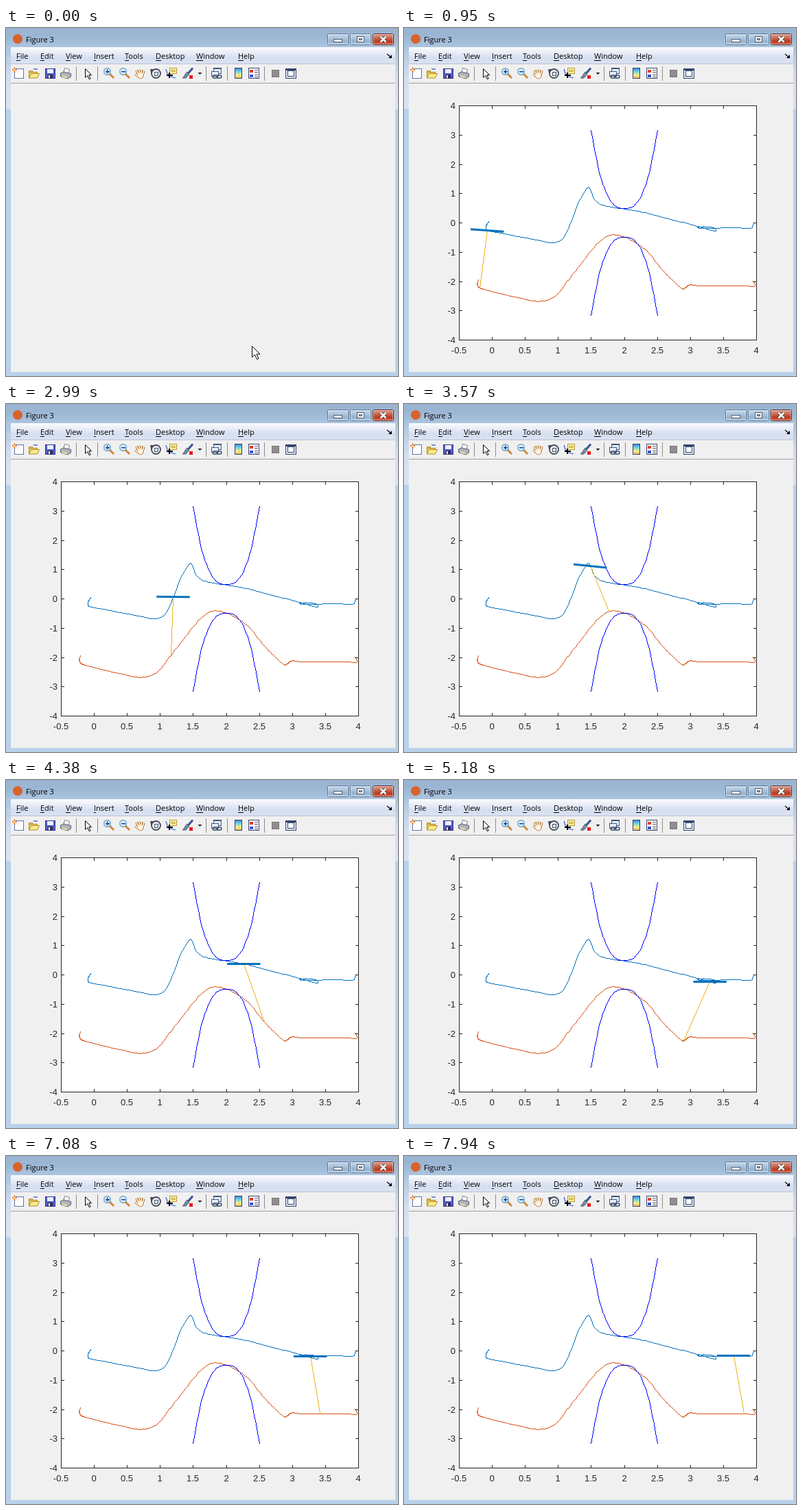
Write an HTML page with a canvas that moves like this. It is 571 px wide and 508 px high and loops after 8 s.

```html
<!DOCTYPE html>
<html lang="en">
<head>
<meta charset="utf-8">
<title>Figure 3</title>
<style>
html, body { margin: 0; width: 100%; height: 100%; overflow: hidden; background: #f0f0f0; }
canvas { display: block; }
</style>
</head>
<body>
<canvas id="stage" width="571" height="508"></canvas>
<script>
const LOOP = 8000, START = 90, STEP = 78, END = 8600;
const stage = document.getElementById('stage');
const ctx = stage.getContext('2d');

// Waypoints: time, x, y
const vehicle = [
  [0, 123, 282], [600, 119, 290], [950, 121, 295], [1400, 138, 298.5], [2120, 191, 308.5],
  [2450, 218, 313], [2720, 233, 304], [2980, 243.5, 281], [3150, 254, 254], [3400, 267.5, 232],
  [3560, 272, 238], [3720, 277, 250], [3920, 292, 259], [4380, 346, 268], [4960, 427, 289],
  [5300, 453, 296], [5560, 451, 291.5], [6030, 437, 289.5], [6420, 427, 291], [6900, 438, 292],
  [7940, 482, 291], [8400, 505, 291.5], [END, 508.5, 285]];
const load = [
  [0, 108, 367], [600, 106.5, 374], [950, 110, 379], [1400, 127, 384], [2120, 170, 394],
  [2420, 198, 398.5], [2720, 221, 390], [2980, 240, 366], [3420, 288, 308], [3680, 313, 302.5],
  [4070, 350, 322], [4380, 376, 353], [5000, 404, 379.5], [5300, 409, 379], [5700, 414, 375],
  [6030, 419, 374.5], [6420, 431, 376], [7940, 497, 376], [8300, 507, 377], [8420, 511, 376],
  [END, 508, 369]];

// Smooth passage through the waypoints
function along(path, t) {
  const last = path.length - 1;
  let i = 0;
  while (i < last - 1 && path[i + 1][0] <= t) i++;
  const a = path[i], b = path[i + 1], span = b[0] - a[0], f = (t - a[0]) / span;
  const speed = (j, k) => {
    const p = path[Math.max(0, j - 1)], q = path[Math.min(last, j + 1)];
    return (q[k] - p[k]) / (q[0] - p[0]) * span;
  };
  return [1, 2].map(k => a[k] + (b[k] - a[k]) * f * f * (3 - 2 * f) +
    f * (1 - f) * ((1 - f) * speed(i, k) - f * speed(i + 1, k)));
}

const range = (n, fn) => Array.from({ length: n }, (_, i) => fn(i));
const trace = path => range(END / 25 + 1, i => along(path, i * 25));
const bump = (t, mid, width) => Math.exp(-(((t - mid) / width) ** 2));
const tilt = t => 4 * bump(t, 850, 250) + 5 * bump(t, 3600, 450);

function layer(draw) {
  const c = document.createElement('canvas');
  c.width = stage.width;
  c.height = stage.height;
  draw(c.getContext('2d'));
  return c;
}

function rect(g, color, x, y, w, h) {
  g.fillStyle = color;
  g.fillRect(x, y, w, h);
}

function box(g, fill, edge, x, y, w, h) {
  rect(g, edge, x, y, w, h);
  rect(g, fill, x + 1, y + 1, w - 2, h - 2);
}

function paint(g, fill, stroke, width = 1) {
  if (fill) { g.fillStyle = fill; g.fill(); }
  if (stroke) { g.strokeStyle = stroke; g.lineWidth = width; g.stroke(); }
}

function poly(g, pts, fill, stroke, width) {
  g.beginPath();
  pts.forEach(p => g.lineTo(p[0], p[1]));
  if (fill) g.closePath();
  paint(g, fill, stroke, width);
}

const line = (g, color, width, x, y, p, q) => poly(g, [[x, y], [p, q]], null, color, width);

function oval(g, x, y, rx, ry, fill, stroke, width) {
  g.beginPath();
  g.ellipse(x, y, rx, ry, 0, 0, 7);
  paint(g, fill, stroke, width);
}

function shade(g, y0, y1, ...colors) {
  const s = g.createLinearGradient(0, y0, 0, y1);
  colors.forEach((c, i) => s.addColorStop(i / (colors.length - 1), c));
  return s;
}

// Hard-edged one-pixel line
function pixelLine(g, color, pts) {
  g.fillStyle = color;
  for (let i = 1; i < pts.length; i++) {
    const [x, y] = pts[i - 1].map(Math.round), [p, q] = pts[i].map(Math.round);
    const n = Math.max(Math.abs(p - x), Math.abs(q - y), 1);
    for (let k = 0; k <= n; k++)
      g.fillRect(Math.round(x + (p - x) * k / n), Math.round(y + (q - y) * k / n), 1, 1);
  }
}

function pointer(g, x, y, size) {
  const shape = [[0, 0], [0, 16], [4, 12.5], [7, 19], [9.5, 18], [6.5, 11.5], [11.5, 11.5]];
  poly(g, shape.map(p => [x + 0.5 + p[0] * size, y + 0.5 + p[1] * size]), '#fff', '#000');
}

function windowButton(g, x, colors, edge) {
  g.beginPath();
  g.roundRect(x + 0.5, 8.5, 30, 16, 2);
  paint(g, shade(g, 8, 25, ...colors), edge);
  g.strokeStyle = 'rgba(255,255,255,.45)';
  g.strokeRect(x + 1.5, 9.5, 28, 14);
}

function magnifier(g, x, plus) {
  line(g, '#c98a3a', 3, x + 9, 67, x + 15, 73);
  oval(g, x + 5.5, 63.5, 4.8, 4.8, '#d9f1fb', '#6fa3c7', 1.4);
  rect(g, '#1b3f94', x + 3, 63, 6, 1.5);
  if (plus) rect(g, '#1b3f94', x + 5, 60.5, 1.5, 6);
}

function toolbar(g) {
  const navy = '#34466e';
  [102, 133, 291, 322, 376].forEach(x => rect(g, '#8c8c8c', x, 56, 1, 21));

  // new
  box(g, '#fdfdff', '#5c78a8', 12, 59, 14, 15);
  line(g, '#e8562a', 1.5, 9, 61, 16, 61);
  line(g, '#e8562a', 1.5, 12.5, 57.5, 12.5, 65);
  oval(g, 12.5, 61, 1.8, 1.8, '#ffcf4a');
  // open
  box(g, '#f5d35c', '#b3892b', 33, 62, 6, 11);
  box(g, '#f5d35c', '#b3892b', 33, 64, 13, 9);
  poly(g, [[33.5, 73], [36.5, 66.5], [48.5, 66.5], [45.5, 73]], '#ffe98c', '#b3892b');
  line(g, '#3d6cb0', 1.4, 40, 60, 46, 60);
  // save
  box(g, '#5659c4', '#33358a', 57, 59, 15, 15);
  rect(g, '#e9f0fb', 60, 60, 9, 6);
  rect(g, '#2c2e55', 61, 68, 7, 5);
  rect(g, '#f4f4f4', 62, 69, 2, 4);
  // print
  poly(g, [[83.5, 66], [85.5, 58.5], [92.5, 60.5], [90.5, 67]], '#fff', '#77808c');
  poly(g, [[79.5, 66], [84, 64], [94.5, 66.5], [94.5, 71], [89.5, 74], [79.5, 70.5]], '#aeb4bf', '#565d68');
  line(g, '#f4e6a0', 2, 82, 70, 89, 72.5);

  pointer(g, 115, 59, 0.8);
  magnifier(g, 142, true);
  magnifier(g, 165, false);
  // pan
  const hand = (width, color) => {
    for (let i = 0; i < 4; i++) line(g, color, width, 193 + i * 2, 68, 190 + i * 3.7, 60.5 + Math.abs(i - 1.4));
    line(g, color, width, 193, 71, 188.5, 67);
    oval(g, 196, 69.5, 2.7 + width / 2, 3 + width / 2, color);
  };
  hand(3.6, '#a46a2c');
  hand(1.8, '#fff3dc');
  // rotate
  oval(g, 218.5, 66.5, 6.5, 6.5, null, '#444d5c', 1.8);
  poly(g, [[210, 60], [216, 60], [211, 66]], '#444d5c');
  box(g, '#d8e4f4', '#46546a', 216, 64, 6, 6);
  // data tip
  box(g, '#fff3a8', '#b59a37', 238, 58, 11, 9);
  rect(g, '#b59a37', 240, 61, 7, 1);
  rect(g, '#b59a37', 240, 63, 7, 1);
  poly(g, [[233, 60], [235, 67], [240, 71], [247, 73]], null, '#3455c8', 1.2);
  rect(g, '#000', 234, 68, 9, 2);
  rect(g, '#000', 237, 65, 2, 8);
  // brush
  line(g, '#35568f', 3, 272, 58.5, 265, 66.5);
  poly(g, [[264, 64], [267, 67], [262, 73], [257.5, 73]], '#7d8ca5', '#44516a');
  rect(g, '#f01414', 267, 69, 5, 5);
  poly(g, [[279.5, 65], [285.5, 65], [282.5, 68]], '#222');
  // link
  box(g, '#e7edf7', '#3f5682', 302, 58, 12, 9);
  rect(g, '#3f5682', 302, 58, 12, 2);
  box(g, '#e7edf7', '#3f5682', 299, 63, 11, 8);
  oval(g, 304.5, 71, 3.5, 2.2, null, '#3f4c68', 1.5);
  oval(g, 310.5, 71, 3.5, 2.2, null, '#3f4c68', 1.5);
  // colour bar
  box(g, shade(g, 58, 74, '#3c78e0', '#6cd1e6', '#f5ee85', '#f4a95c'), navy, 333, 58, 11, 16);
  // legend
  box(g, '#fff', navy, 353, 58, 16, 16);
  rect(g, '#e23a2e', 355, 61, 5, 4);
  rect(g, '#3a4fd0', 355, 68, 5, 4);
  [61, 64, 68, 71].forEach(y => rect(g, '#555', 362, y, 5, 1));
  // hide and show tools
  box(g, '#8e8e8e', '#777', 387, 61, 11, 11);
  box(g, '#dce6f5', navy, 407, 59, 16, 15);
  rect(g, navy, 407, 59, 16, 3);
  box(g, '#fff', navy, 410, 62, 10, 9);
}

const chrome = layer(g => {
  rect(g, '#b9d1ea', 0, 0, 571, 508);
  rect(g, shade(g, 0, 28, '#98b3d0', '#9cb8d5', '#adc5df'), 0, 0, 571, 28);
  rect(g, shade(g, 28, 118, '#adc5df', '#d2deef', '#dae4f3'), 0, 28, 571, 90);
  rect(g, '#f0f0f0', 7, 28, 560, 474);
  rect(g, shade(g, 28, 52, '#fbfcfe', '#e8edf7', '#d5def0', '#dae2f2'), 7, 28, 560, 24);
  rect(g, '#b6bccc', 7, 52, 560, 1);
  rect(g, '#f6f7f9', 7, 53, 560, 1);
  rect(g, '#a0a0a0', 7, 80, 560, 1);

  oval(g, 17, 16, 7, 7, '#d9622b');
  g.font = '11px "Open Sans", sans-serif';
  g.fillStyle = '#000';
  g.fillText('Figure 3', 29, 21);
  const menus = { File: 15, Edit: 50, View: 87, Insert: 128, Tools: 173, Desktop: 218, Window: 277, Help: 338 };
  for (const [name, x] of Object.entries(menus)) {
    g.fillText(name, x, 45);
    g.fillRect(x, 47, Math.round(g.measureText(name[0]).width), 1);
  }
  line(g, '#000', 1.2, 555, 38, 560, 42);
  poly(g, [[562, 39], [562, 44], [557, 44]], '#000');

  const blue = ['#c9d9ea', '#b3c8de', '#96b1ce', '#b5cce4'];
  windowButton(g, 468, blue, '#5c7692');
  windowButton(g, 501, blue, '#5c7692');
  windowButton(g, 534, ['#e3a89b', '#d0705c', '#b93a20', '#d4674a'], '#5b2a2a');
  box(g, '#fff', '#4d5a6b', 477, 16, 13, 5);
  box(g, '#fff', '#4d5a6b', 511, 12, 11, 9);
  box(g, '#a9bfd8', '#4d5a6b', 514, 15, 5, 3);
  for (const [color, width] of [['#5b3a3a', 4.5], ['#fff', 2.5]])
    for (const s of [4, -4]) line(g, color, width, 549.5 - s, 12.5, 549.5 + s, 20.5);
  toolbar(g);
});

const px = x => 80 + (x + 0.5) * 433 / 4.5;
const py = y => 113 + (4 - y) * 342 / 8;

const plot = layer(g => {
  const ink = '#262626';
  box(g, '#fff', ink, 80, 113, 434, 343);
  g.font = '13px "Liberation Sans", Arial, sans-serif';
  g.textAlign = 'center';
  for (let v = -0.5; v <= 4; v += 0.5) {
    const x = Math.round(px(v));
    rect(g, ink, x, 451, 1, 4);
    rect(g, ink, x, 114, 1, 4);
    g.fillText(v, x, 475);
  }
  g.textAlign = 'right';
  for (let v = -4; v <= 4; v++) {
    const y = Math.round(py(v));
    rect(g, ink, 81, y, 4, 1);
    rect(g, ink, 509, y, 4, 1);
    g.fillText(v, 75, y + 5);
  }
  pixelLine(g, '#0072bd', trace(vehicle));
  pixelLine(g, '#d95319', trace(load));
  for (const side of [1, -1])
    pixelLine(g, '#0000ff', range(41, i => {
      const d = (i - 20) / 40;
      return [px(2 + d), py(side * (0.49 + 2.66 * Math.abs(2 * d) ** 2.7))];
    }));
});

function render(t) {
  ctx.drawImage(chrome, 0, 0);
  if (t >= START) {
    const shown = t - (t - START) % STEP;
    const [x, y] = along(vehicle, shown), lean = tilt(shown) / 2, mid = Math.round(y) + 0.5;
    ctx.drawImage(plot, 0, 0);
    pixelLine(ctx, '#edb120', [[x, y], along(load, shown)]);
    line(ctx, '#0072bd', 3, x - 24, mid - lean, x + 24.5, mid + lean);
  }
  if (t < 240) pointer(ctx, 358, 464, 1);
  else if (t < 316) pointer(ctx, 373, 485, 1);
}

function tick() {
  render(performance.now() % LOOP);
  requestAnimationFrame(tick);
}
tick();
</script>
</body>
</html>
```
